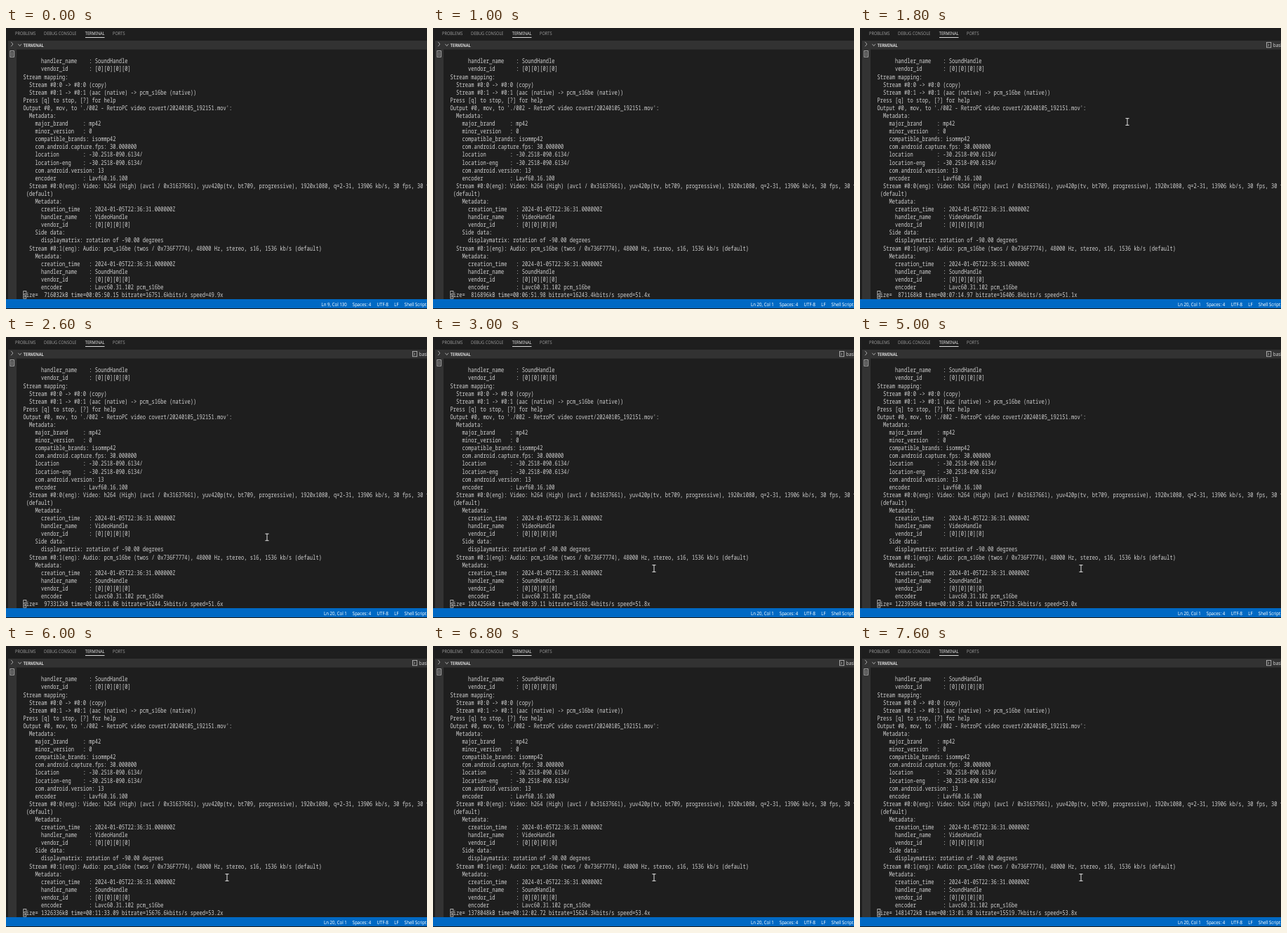
An HTML page with a canvas for the animation above (8 s loop, 600 by 400 pixels).

```html
<!DOCTYPE html>
<html lang="en">
<head>
<meta charset="utf-8">
<title>Terminal</title>
<style>
  html, body { margin: 0; width: 100%; height: 100%; overflow: hidden; background: #1e1e1e; }
  canvas { display: block; width: 600px; height: 400px; }
</style>
</head>
<body>
<canvas id="stage" width="600" height="400"></canvas>
<script>
const ctx = document.getElementById('stage').getContext('2d');
const LOOP = 8000, STEP = 200;
// the screen is shown squeezed; the terminal face is narrower than the labels
const UI = { sx: 0.506, sy: 0.59 }, TERM = { sx: 0.443, sy: 0.59 };
const MONO = '16px "Noto Sans Mono", monospace';
const SANS = '"Noto Sans", sans-serif';
const LEFT = 24.6, FIRST = 50.4, ROW = 11.09;

const LOG = `      handler_name    : SoundHandle
      vendor_id       : [0][0][0][0]
Stream mapping:
  Stream #0:0 -> #0:0 (copy)
  Stream #0:1 -> #0:1 (aac (native) -> pcm_s16be (native))
Press [q] to stop, [?] for help
Output #0, mov, to './002 - RetroPC video covert/20240105_192151.mov':
  Metadata:
    major_brand     : mp42
    minor_version   : 0
    compatible_brands: isommp42
    com.android.capture.fps: 30.000000
    location        : -30.2518-090.6134/
    location-eng    : -30.2518-090.6134/
    com.android.version: 13
    encoder         : Lavf60.16.100
  Stream #0:0(eng): Video: h264 (High) (avc1 / 0x31637661), yuv420p(tv, bt709, progressive), 1920x1080, q=2-31, 13906 kb/s, 30 fps, 30 tbr
 (default)
    Metadata:
      creation_time   : 2024-01-05T22:36:31.000000Z
      handler_name    : VideoHandle
      vendor_id       : [0][0][0][0]
    Side data:
      displaymatrix: rotation of -90.00 degrees
  Stream #0:1(eng): Audio: pcm_s16be (twos / 0x736F7774), 48000 Hz, stereo, s16, 1536 kb/s (default)
    Metadata:
      creation_time   : 2024-01-05T22:36:31.000000Z
      handler_name    : SoundHandle
      vendor_id       : [0][0][0][0]
      encoder         : Lavc60.31.102 pcm_s16be`.split('\n');

// report number, size in kB, seconds encoded, bitrate, speed
const REPORTS = [
  [0, 716032, 350.15, 16751.6, 49.9],
  [2, 816896, 411.98, 16243.4, 51.4],
  [3, 871168, 434.97, 16406.8, 51.1],
  [6, 1024256, 519.11, 16163.4, 51.8],
  [8, 1121536, 583.32, 15750.3, 52.9],
  [12, 1326336, 693.09, 15676.6, 53.2],
  [15, 1481472, 781.98, 15519.7, 53.8]
];

// time, x, y
const POINTER = [
  [1600, 360, 62], [1800, 381, 133.5], [2000, 399.5, 211], [2200, 399.5, 231],
  [2400, 399.5, 231], [2600, 372, 285], [2800, 326, 323], [3000, 315, 329.5]
];

function sample(keys, at) {
  const i = keys.findIndex(k => k[0] >= at);
  if (i < 0) return keys[keys.length - 1];
  if (i === 0) return keys[0];
  const a = keys[i - 1], b = keys[i];
  const f = (at - a[0]) / (b[0] - a[0]);
  return a.map((v, j) => v + (b[j] - v) * f);
}

function rect(x, y, w, h, color) {
  ctx.fillStyle = color;
  ctx.fillRect(x, y, w, h);
}

function box(x, y, w, h, color) {
  ctx.strokeStyle = color;
  ctx.lineWidth = 0.8;
  ctx.strokeRect(x, y, w, h);
}

function line(points, color, width) {
  ctx.beginPath();
  points.forEach(([x, y]) => ctx.lineTo(x, y));
  ctx.strokeStyle = color;
  ctx.lineWidth = width;
  ctx.stroke();
}

function text(str, x, y, font, color, { align = 'left', scale = UI } = {}) {
  ctx.save();
  ctx.translate(x, y);
  ctx.scale(scale.sx, scale.sy);
  ctx.font = font;
  ctx.textRendering = 'geometricPrecision';
  ctx.textAlign = align;
  ctx.fillStyle = color;
  ctx.fillText(str, 0, 0);
  ctx.restore();
}

function progress(n) {
  const [, size, secs, rate, speed] = sample(REPORTS, n);
  const kb = String(Math.round(size / 256) * 256).padStart(8);
  const min = String(Math.floor(secs / 60)).padStart(2, '0');
  const sec = (secs % 60).toFixed(2).padStart(5, '0');
  return `size=${kb}kB time=00:${min}:${sec} bitrate=${rate.toFixed(1)}kbits/s speed=${speed.toFixed(1)}x`;
}

function drawPanel(t) {
  rect(0, 0, 600, 400, '#1e1e1e');
  rect(3, 18, 12, 368, '#333333');
  rect(15, 18, 585, 12.6, '#323232');

  const tab = '11.2px ' + SANS;
  text('PROBLEMS', 13, 10.4, tab, '#999');
  text('DEBUG CONSOLE', 54, 10.4, tab, '#999');
  text('TERMINAL', 112.8, 10.4, tab, '#e7e7e7');
  text('PORTS', 152, 10.4, tab, '#999');
  rect(113, 13, 27.5, 1, '#d8d8d8');

  line([[7.2, 19.8], [9.9, 23], [7.2, 26.2]], '#bdbdbd', 0.8);
  line([[17.4, 22.8], [19.7, 25.6], [22, 22.8]], '#c5c5c5', 0.8);
  text('TERMINAL', 24.8, 26.8, 'bold 11px ' + SANS, '#d8d8d8');

  // terminal list icon
  box(5.9, 32.6, 5.6, 8.6, '#c5c5c5');
  for (let y = 35; y < 40; y += 2) line([[7.2, y], [10.2, y]], '#b5b5b5', 0.8);

  if (t >= 1600) {
    box(579.6, 20.4, 6.2, 7.4, '#c5c5c5');
    line([[581, 22.4], [582.8, 24.2], [581, 26]], '#c5c5c5', 0.8);
    text('bash', 588.8, 26.8, '12.5px ' + SANS, '#d0d0d0');
  }
}

function drawTerminal(t) {
  LOG.concat(progress(Math.floor(t / 500))).forEach((row, i) =>
    text(row, LEFT, FIRST + i * ROW, MONO, '#d0d0d0', { scale: TERM }));
  box(LEFT + 0.3, 374.5, 3.9, 10.6, '#cccccc');
}

function drawStatus(t) {
  rect(0, 386, 600, 13, '#0069c4');
  const font = '12px ' + SANS, y = 395.5;
  text(t < 400 ? 'Ln 9, Col 130' : 'Ln 20, Col 1', 485.8, y, font, '#fff', { align: 'right' });
  text('Spaces: 4', 493.8, y, font, '#fff');
  text('UTF-8', 528.6, y, font, '#fff');
  text('LF', 553.2, y, font, '#fff');
  text('Shell Script', 567.8, y, font, '#fff');
}

function drawPointer(t) {
  if (t < POINTER[0][0]) return;
  const [, x, y] = sample(POINTER, t);
  for (const [color, w] of [['#101010', 2.4], ['#f0f0f0', 1]]) {
    line([[x - 2.6, y - 4.8], [x + 2.6, y - 4.8]], color, w);
    line([[x, y - 4.8], [x, y + 4.8]], color, w);
    line([[x - 2.6, y + 4.8], [x + 2.6, y + 4.8]], color, w);
  }
}

function draw(now) {
  const t = Math.floor((now % LOOP) / STEP) * STEP;
  drawPanel(t);
  drawTerminal(t);
  drawStatus(t);
  drawPointer(t);
}

const start = performance.now();
function tick() {
  draw(performance.now() - start);
  requestAnimationFrame(tick);
}
tick();
</script>
</body>
</html>
```
